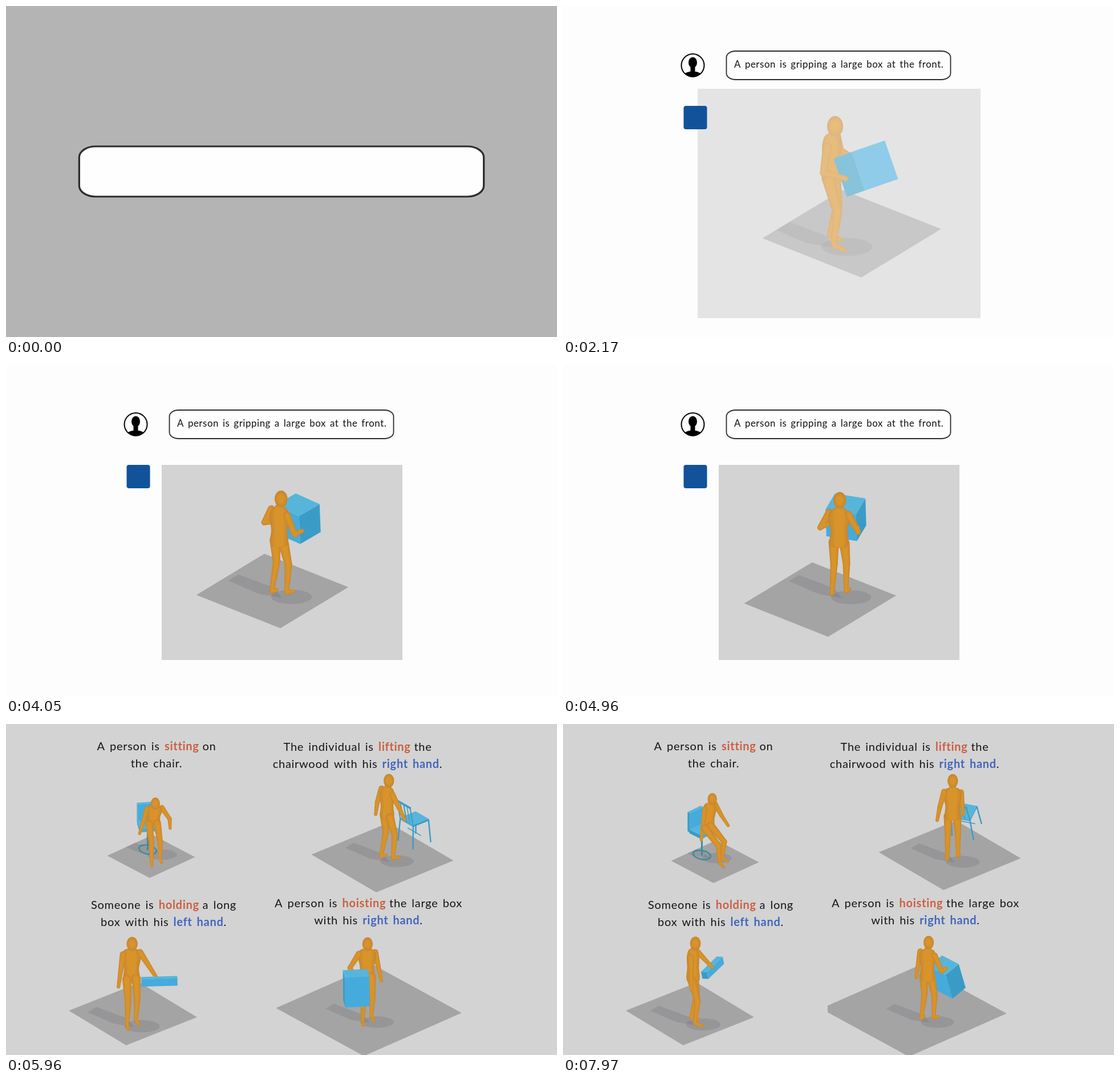
An HTML page with a canvas that plays this animation: 966x580 px, repeating every 8000 ms.

```html
<!DOCTYPE html>
<html lang="en">
<head>
<meta charset="utf-8">
<title>Text to motion</title>
<style>
  html, body { margin: 0; width: 100%; height: 100%; overflow: hidden; background: #b4b4b4; }
  canvas { display: block; width: 966px; height: 580px; }
</style>
</head>
<body>
<canvas id="stage" width="966" height="580"></canvas>
<script>
const ctx = document.getElementById('stage').getContext('2d');
const W = 966, H = 580, LOOP = 8000;
const PROMPT = 'A person is gripping a large box at the front.';
const GRAY = 211, WHITE = 253;
const BLUES = ['#3a9cc6', '#45abdd', '#57b5d9'];

const clamp = v => Math.max(0, Math.min(1, v));
const ramp = (t, from, to) => clamp((t - from) / (to - from));
const ease = u => u * u * (3 - 2 * u);
const lerp = (a, b, u) => a + (b - a) * u;
const mix = (a, b, u) => a.map((v, i) => lerp(v, b[i], u));
const gray = (v, a = 1) => `rgba(${v},${v},${v},${a})`;

// Body space has the person's height as its unit: x to their left, y forward, z up.
// Yaw 0 faces the viewer and 90 faces screen right; ground is the centre of the floor tile.
const carrier = {
  radius: 134, skew: -6, hands: [[0.13, 0.15, 0.6], [-0.13, 0.15, 0.6]],
  prop: 'box', at: [0, 0.25, 0.63], half: [0.14, 0.13, 0.14],
  keys: [
    { t: 2840, x: 473, y: 405, tall: 190, yaw: 70, tip: 0.6, ground: [503, 391] },
    { t: 4050, x: 479, y: 401, tall: 179, yaw: 140, tip: 0.05, ground: [467, 396] },
    { t: 5510, x: 487, y: 402, tall: 175, yaw: 182, tip: 0.1, ground: [441, 420] }]
};
const sitter = {
  radius: 77, skew: 2, hipHeight: 0.39, step: 0.22, hands: [[0.18, 0.16, 0.4], [-0.17, 0.06, 0.3]],
  prop: 'armchair', at: [-0.06, -0.04, 0.34],
  keys: [
    { t: 5960, x: 258, y: 225, tall: 130, yaw: 8, lean: 0.4, ground: [254.5, 232] },
    { t: 7970, x: 254, y: 231, tall: 130, yaw: 45, lean: 0.12, ground: [266.5, 241] }]
};
const lifter = {
  radius: 125, skew: 5, hands: [[0.16, -0.02, 0.47], [-0.1, 0.16, 0.45]],
  prop: 'chair', at: [-0.1, 0.29, 0.41],
  keys: [
    { t: 5960, x: 668, y: 236, tall: 147, yaw: 130, tip: 0, ground: [660, 234] },
    { t: 7970, x: 683, y: 237, tall: 147, yaw: 176, tip: 0.3, ground: [678, 230] }]
};
const holder = {
  radius: 113, skew: 6, hands: [[0.24, 0.14, 0.53], [-0.14, 0.02, 0.45]],
  prop: 'box', at: [0.25, 0.14, 0.52], half: [0.18, 0.035, 0.04],
  keys: [
    { t: 5960, x: 220, y: 525, tall: 154, yaw: 15, tip: 0.2, ground: [222.5, 508] },
    { t: 7970, x: 228, y: 522, tall: 150, yaw: 75, tip: 0.2, ground: [222.5, 508] }]
};
const hoister = {
  radius: 163, skew: 3, hands: [[0.15, 0.02, 0.46], [-0.15, 0.13, 0.6]],
  prop: 'box', at: [-0.15, 0.16, 0.48], half: [0.13, 0.1, 0.17],
  keys: [
    { t: 5960, x: 633, y: 518, tall: 146, yaw: 12, tip: 0.1, ground: [636, 502] },
    { t: 7970, x: 639, y: 518, tall: 145, yaw: 150, tip: 0.3, ground: [615, 503] }]
};

const CAPTIONS = [
  [264, 46, 'A person is *sitting* on', 'the chair.'],
  [616.5, 47, 'The individual is *lifting* the', 'chairwood with his _right hand_.'],
  [276.5, 324, 'Someone is *holding* a long', 'box with his _left hand_.'],
  [635.5, 321, 'A person is *hoisting* the large box', 'with his _right hand_.']
];

function poseAt(keys, t) {
  let i = 0;
  while (i < keys.length - 2 && t > keys[i + 1].t) i++;
  const [a, b] = [keys[i], keys[i + 1]], u = ramp(t, a.t, b.t), pose = {};
  for (const k in a) pose[k] = Array.isArray(a[k]) ? mix(a[k], b[k], u) : lerp(a[k], b[k], u);
  return pose;
}

function spin(a, b, angle) {
  const c = Math.cos(angle), s = Math.sin(angle);
  return [a * c - b * s, a * s + b * c];
}

// Maps body space to [screen x, screen y, depth, nearness to the camera].
function projector({ x, y, tall, yaw }) {
  const a = yaw * Math.PI / 180;
  return ([px, py, pz]) => {
    const side = px * Math.cos(a) + py * Math.sin(a);
    const depth = py * Math.cos(a) - px * Math.sin(a);
    return [x + 1.14 * tall * side, y + tall * (0.55 * depth - pz), depth, 0.87 * depth + 0.49 * pz];
  };
}

// Middle joint of a two-bone limb, bent towards the pole direction.
function bend(a, b, bone, pole) {
  const reach = Math.hypot(...a.map((v, i) => v - b[i])) / 2;
  const out = Math.sqrt(Math.max(0, bone * bone - reach * reach)) / Math.hypot(...pole);
  return mix(a, b, 0.5).map((v, i) => v + pole[i] * out);
}

function trace(pts) {
  ctx.beginPath();
  pts.forEach(p => ctx.lineTo(p[0], p[1]));
  ctx.closePath();
}

function traceSmooth(pts) {
  ctx.beginPath();
  pts.forEach((p, i) => {
    const m = mix(p, pts[(i + 1) % pts.length], 0.5);
    if (i) ctx.quadraticCurveTo(p[0], p[1], m[0], m[1]);
    else ctx.moveTo(m[0], m[1]);
  });
  const first = mix(pts[0], pts[1], 0.5);
  ctx.quadraticCurveTo(pts[0][0], pts[0][1], first[0], first[1]);
}

function fillShape(pts, color) {
  trace(pts);
  ctx.fillStyle = color;
  ctx.fill();
}

function strokeLine(a, b, width, color = BLUES[0]) {
  ctx.beginPath();
  ctx.moveTo(a[0], a[1]);
  ctx.lineTo(b[0], b[1]);
  ctx.lineWidth = width;
  ctx.strokeStyle = color;
  ctx.lineCap = 'round';
  ctx.stroke();
}

function ellipse(x, y, rx, ry, color) {
  ctx.beginPath();
  ctx.ellipse(x, y, rx, ry, 0, 0, 2 * Math.PI);
  ctx.fillStyle = color;
  ctx.fill();
}

// Paints one body part in nested passes, from its rim to its lit core.
function shaded(paint) {
  [[1, '#c68733'], [0.82, '#d08d2c'], [0.55, '#d8932a']].forEach(([k, color]) => {
    ctx.fillStyle = color;
    paint(k);
  });
}

function taper([ax, ay], [bx, by], ra, rb) {
  const angle = Math.atan2(by - ay, bx - ax), q = Math.PI / 2;
  ctx.beginPath();
  ctx.arc(ax, ay, ra, angle + q, angle + 3 * q);
  ctx.arc(bx, by, rb, angle - q, angle + q);
  ctx.fill();
}

function limb(joints, radii) {
  shaded(k => {
    for (let i = 1; i < joints.length; i++) taper(joints[i - 1], joints[i], radii[i - 1] * k, radii[i] * k);
  });
}

function bodyParts(actor, pose, project) {
  const { tall, yaw, lean = 0 } = pose;
  const { hipHeight = 0.51, step = 0 } = actor;
  const sized = radii => radii.map(r => r * tall);
  const upper = (x, y, z) => {
    const [fy, fz] = spin(y, z - 0.51, -lean);
    return [x, fy, fz + hipHeight];
  };
  const parts = [];
  const addLimb = (joints, radii) => {
    const pts = joints.map(project);
    parts.push({ depth: pts[1][2], draw: () => limb(pts, sized(radii)) });
  };

  [1, -1].forEach((side, i) => {
    const shoulder = upper(0.088 * side, 0, 0.8), hand = actor.hands[i];
    addLimb([shoulder, bend(shoulder, hand, 0.17, [0.5 * side, -0.6, -0.5]), hand], [0.036, 0.028, 0.02]);
    const hip = [0.048 * side, 0, hipHeight];
    const ankle = [0.055 * side, step - 0.035 * side, 0.02];
    addLimb([hip, bend(hip, ankle, 0.25, [0, 1, 0.4]), ankle, [0.065 * side, ankle[1] + 0.08, 0]],
      [0.052, 0.037, 0.022, 0.017]);
  });

  // Cross sections: height, half width, half depth.
  const sections = [[0.86, 0.03, 0.03], [0.83, 0.09, 0.05], [0.74, 0.1, 0.066],
    [0.63, 0.07, 0.055], [0.53, 0.088, 0.072], [0.46, 0.075, 0.06]];
  const angle = yaw * Math.PI / 180;
  const torso = k => {
    const edge = side => sections.map(([z, w, d]) => {
      const [x, y] = project(upper(0, 0, z));
      return [x + side * k * 1.14 * tall * Math.hypot(w * Math.cos(angle), d * Math.sin(angle)), y];
    });
    traceSmooth([...edge(-1), ...edge(1).reverse()]);
    ctx.fill();
  };
  const head = project(upper(0, 0.025, 0.92)), chest = project(upper(0, 0, 0.8));
  parts.push({
    depth: chest[2] / 2,
    draw() {
      limb([head, chest], sized([0.032, 0.045]));
      shaded(torso);
      shaded(k => {
        ctx.beginPath();
        ctx.ellipse(head[0], head[1], 0.063 * tall * k, 0.081 * tall * k, 0, 0, 2 * Math.PI);
        ctx.fill();
      });
    }
  });
  return parts;
}

function cuboid(place, half, center = [0, 0, 0]) {
  const middle = place(center)[3];
  const corner = (axis, sign, a, b) => {
    const p = [...center];
    [sign, a, b].forEach((v, i) => p[(axis + i) % 3] += v * half[(axis + i) % 3]);
    return place(p);
  };
  for (let axis = 0; axis < 3; axis++) for (const sign of [-1, 1]) {
    const face = [[-1, -1], [1, -1], [1, 1], [-1, 1]].map(([a, b]) => corner(axis, sign, a, b));
    if ((face[0][3] + face[2][3]) / 2 > middle) fillShape(face, BLUES[axis]);
  }
}

const props = {
  box: (place, actor) => cuboid(place, actor.half),
  armchair(place, actor, tall) {
    const base = place([0, 0, -0.32]);
    ctx.beginPath();
    ctx.ellipse(base[0], base[1], 0.12 * tall, 0.06 * tall, 0.2, 0, 2 * Math.PI);
    ctx.lineWidth = 2.5;
    ctx.strokeStyle = '#3a8ca8';
    ctx.stroke();
    strokeLine(place([0, 0, 0]), base, 3, '#3a8ca8');
    cuboid(place, [0.11, 0.02, 0.13], [0, -0.11, 0.12]);
    cuboid(place, [0.11, 0.1, 0.025]);
  },
  chair(place) {
    const r = 0.105, rail = x => place([x, -r * 1.4, 0.23]);
    for (const x of [-r, r]) for (const y of [-r, r]) strokeLine(place([x, y, 0]), place([x * 1.15, y * 1.15, -0.26]), 2.4);
    strokeLine(place([-r, 0, -0.15]), place([r, 0, -0.15]), 1.5);
    cuboid(place, [r, r, 0.012]);
    for (let i = -2; i <= 2; i++) strokeLine(place([i * r / 2, -r, 0]), rail(i * r / 2), i % 2 ? 1.4 : 2);
    strokeLine(rail(-r), rail(r), 3.5);
  }
};

function drawGround({ radius, skew }, { x, y, tall, ground }) {
  const corners = [0, 1, 2, 3].map(i => {
    const a = i * Math.PI / 2 + skew * Math.PI / 180;
    return [ground[0] + radius * Math.cos(a), ground[1] + 0.49 * radius * Math.sin(a)];
  });
  fillShape(corners, '#a4a4a4');
  ctx.save();
  trace(corners);
  ctx.clip();
  const dark = 'rgba(98,98,108,.2)';
  const spot = (dx, dy) => [x + dx * tall, y + dy * tall];
  fillShape([spot(0.03, 0.04), spot(-0.2, 0), spot(-0.5, -0.13), spot(-0.4, -0.19), spot(-0.05, -0.06)], dark);
  ellipse(...spot(0.12, 0.03), 0.2 * tall, 0.07 * tall, dark);
  ctx.restore();
}

function drawActor(actor, t) {
  const pose = poseAt(actor.keys, t), project = projector(pose), { tip = 0, tall } = pose;
  // The prop turns and tips about its own centre.
  const place = ([x, y, z]) => {
    const [ty, tz] = spin(y, z, tip);
    const [rx, ry] = spin(x, ty, tip);
    return project([rx, ry, tz].map((v, i) => v + actor.at[i]));
  };
  drawGround(actor, pose);
  const prop = { depth: project(actor.at)[2], draw: () => props[actor.prop](place, actor, tall) };
  [prop, ...bodyParts(actor, pose, project)]
    .sort((a, b) => a.depth - b.depth)
    .forEach(part => part.draw());
}

function setFont(size, weight = 400) {
  ctx.font = `${weight} ${size}px Lato, sans-serif`;
  ctx.letterSpacing = size * 0.036 + 'px';
  ctx.wordSpacing = size * 0.12 + 'px';
}

// *word* is an action, _word_ a body part.
function drawCaption(line, center, baseline) {
  const runs = line.split(/(\*.*?\*|_.*?_)/).filter(Boolean).map(run => {
    const color = { '*': '#cb5f41', _: '#4265bd' }[run[0]];
    const text = color ? run.slice(1, -1) : run;
    const weight = color ? 700 : 400;
    setFont(20, weight);
    return { text, weight, color: color || '#151515', width: ctx.measureText(text).width };
  });
  let x = center - runs.reduce((sum, run) => sum + run.width, 0) / 2;
  for (const run of runs) {
    setFont(20, run.weight);
    ctx.fillStyle = run.color;
    ctx.fillText(run.text, x, baseline);
    x += run.width;
  }
}

function drawBubble(t) {
  const u = ease(ramp(t, 860, 1240));
  const typed = Math.floor(ramp(t, 20, 880) * PROMPT.length);
  ctx.save();
  ctx.translate(483, lerp(290, 104, u));
  ctx.scale(lerp(1.805, 1, u), lerp(1.76, 1, u));
  ctx.beginPath();
  ctx.roundRect(-196.5, -25, 393, 50, { x: 16, y: 11 });
  ctx.fillStyle = '#fefefe';
  ctx.fill();
  ctx.lineWidth = 1.8;
  ctx.strokeStyle = '#2c2c30';
  ctx.stroke();
  setFont(16.8);
  ctx.fillStyle = '#111';
  ctx.fillText(PROMPT.slice(0, typed), -183, 4);
  ctx.restore();
}

function drawAvatar() {
  ctx.save();
  ctx.beginPath();
  ctx.arc(227.5, 104, 20, 0, 2 * Math.PI);
  ctx.lineWidth = 2;
  ctx.strokeStyle = '#000';
  ctx.stroke();
  ctx.clip();
  ellipse(227.5, 99, 7.5, 9.5, '#000');
  ctx.fillRect(223.5, 104, 8, 12);
  ellipse(227.5, 124, 17, 9.5, '#000');
  ctx.restore();
}

function drawPanel(t, bg) {
  const zoom = lerp(1.3, 1, ease(ramp(t, 1750, 2700)));
  ctx.save();
  ctx.translate(484, 346);
  ctx.scale(zoom, zoom);
  ctx.translate(-484, -346);
  ctx.fillStyle = gray(GRAY);
  ctx.fillRect(273, 175, 422, 342);
  drawActor(carrier, t);
  ctx.fillStyle = gray(bg, 1 - ramp(t, 1750, 2450));
  ctx.fillRect(272, 174, 424, 344);
  ctx.restore();
}

function drawDialog(t, bg) {
  if (t > 1750) drawPanel(t, bg);
  drawBubble(t);
  ctx.globalAlpha = ramp(t, 980, 1240);
  drawAvatar();
  ctx.globalAlpha = ramp(t, 1460, 1750);
  ctx.beginPath();
  ctx.roundRect(211.5, 175, 41, 41, 4);
  ctx.fillStyle = '#11529b';
  ctx.fill();
  ctx.globalAlpha = 1;
}

function drawGallery(t) {
  [sitter, lifter, holder].forEach(actor => drawActor(actor, t));
  ctx.save();
  ctx.beginPath();
  ctx.rect(464, 300, W, H);
  ctx.clip();
  drawActor(hoister, t);
  ctx.restore();
  for (const [x, y, first, second] of CAPTIONS) {
    drawCaption(first, x, y);
    drawCaption(second, x, y + 30);
  }
}

function render(t) {
  const bg = Math.round(lerp(lerp(180, WHITE, ramp(t, 880, 1260)), GRAY, ramp(t, 5300, 5800)));
  ctx.fillStyle = gray(bg);
  ctx.fillRect(0, 0, W, H);
  const swap = 5740;
  if (t < swap) drawDialog(t, bg);
  else drawGallery(t);
  const veil = t < swap ? ramp(t, 5560, swap) : 1 - ramp(t, swap, 5900);
  ctx.fillStyle = gray(bg, veil);
  ctx.fillRect(0, 0, W, H);
}

const start = performance.now();
function tick() {
  render((performance.now() - start) % LOOP);
  requestAnimationFrame(tick);
}
tick();
</script>
</body>
</html>
```
